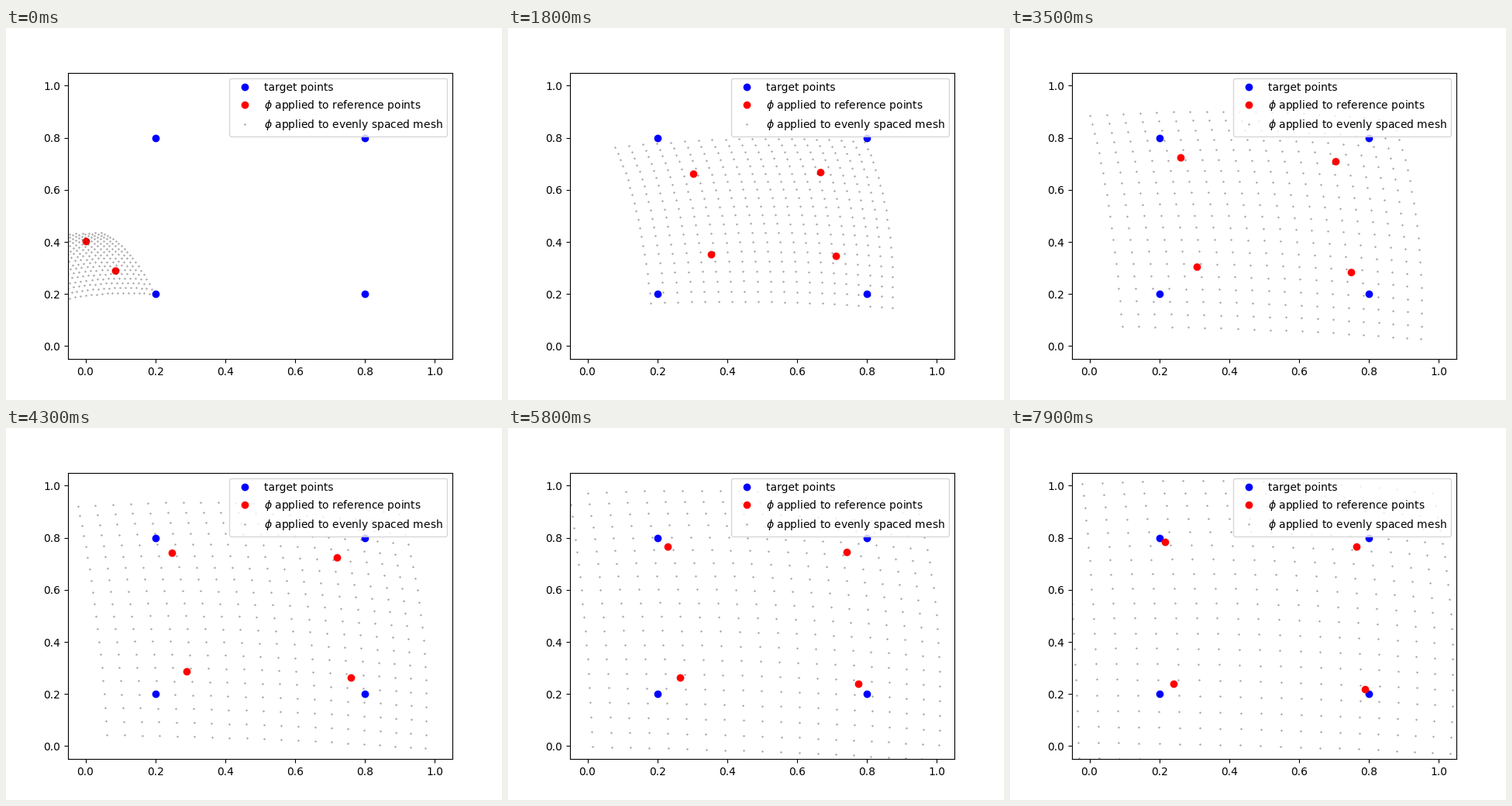
Animation, 640 px wide and 480 px high, one loop 8 s. Source, as a matplotlib script:

```python
import numpy as np
import matplotlib.pyplot as plt
from matplotlib.animation import FuncAnimation

FRAMES, INTERVAL = 80, 100

# Stage positions of the four reference points at a few training steps
POSES = {
    0: [(72, 320), (141, 313), (103, 275), (27, 286)],
    10: [(274, 282), (410, 278), (392, 195), (253, 203)],
    43: [(233, 314), (445, 322), (427, 167), (214, 161)],
    79: [(211, 330), (458, 337), (447, 153), (200, 147)],
}


def decays(t):
    """One fast and two slow decays towards the final map."""
    t = np.atleast_1d(np.asarray(t, float))
    return np.stack([t**0, np.exp(-t/25), np.exp(-t/50), np.exp(-t/1.6)], axis=1)


WEIGHTS = np.linalg.solve(decays(list(POSES)),
                          np.array(list(POSES.values()), float).reshape(4, 8))


def reference_points(t):
    return (decays(t) @ WEIGHTS).reshape(4, 2)


def warp(refs, x, y, t):
    """Bilinear map through the reference points, bent and barrel-shaped."""
    bl, br, tr, tl = refs
    ex = (br + tr - bl - tl)/2
    ey = (tl + tr - bl - br)/2
    twist = bl + tr - br - tl
    r = x**2 + y**2 - .5
    lens = 1 - .023*ex[0]/250*r
    curl = -8*(1 - np.exp(-t/3))
    bend = np.hstack([curl*r, 6*(x**2 - .25) + 13*(y**2 - .25)])
    return refs.mean(axis=0) + (x*ex + y*ey + x*y*twist)*lens + bend


def to_data(px):
    return (px[:, 0] - 80)/496*1.1 - .05, (427.2 - px[:, 1])/369.6*1.1 - .05


side = np.linspace(-1, 1, 20)
gx, gy = (g.reshape(-1, 1) for g in np.meshgrid(side, side))

fig, ax = plt.subplots(figsize=(6.4, 4.8), dpi=100)
ax.set_xlim(-.05, 1.05)
ax.set_ylim(-.05, 1.05)
ax.plot([.2, .8, .2, .8], [.2, .2, .8, .8], 'bo', label='target points')
red, = ax.plot([], [], 'ro', label=r'$\phi$ applied to reference points')
mesh, = ax.plot([], [], 'k.', markersize=.5,
                label=r'$\phi$ applied to evenly spaced mesh')
ax.legend(loc='upper right')


def update(step):
    refs = reference_points(step)
    red.set_data(*to_data(refs))
    mesh.set_data(*to_data(warp(refs, gx, gy, step)))
    return red, mesh


anim = FuncAnimation(fig, update, frames=FRAMES, interval=INTERVAL,
                     repeat=True, repeat_delay=0)
plt.show()
```
